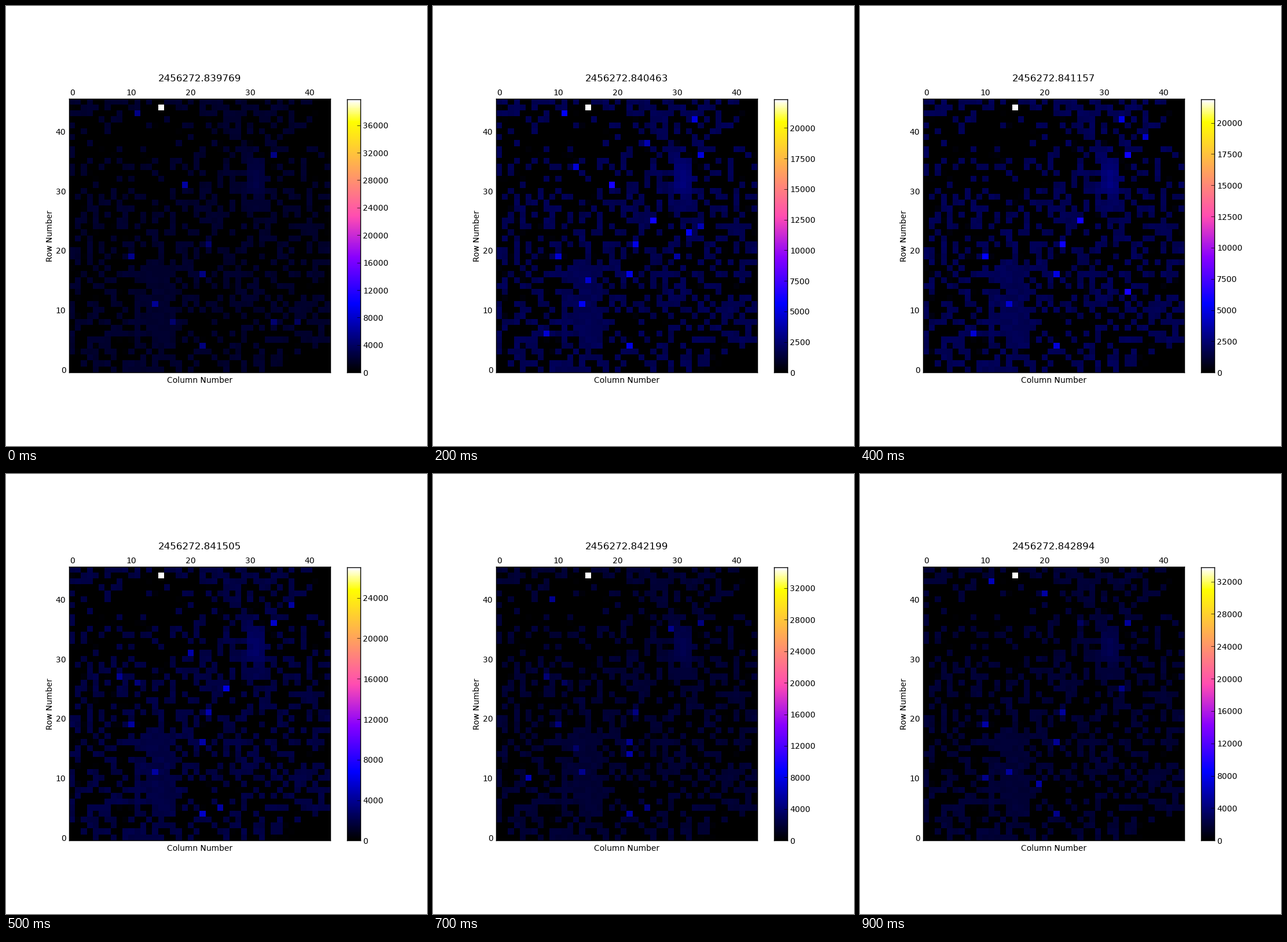
Animation, 727 px wide and 759 px high, one loop 1 s. Source, as a matplotlib script:

```python
import numpy as np
import matplotlib.pyplot as plt
from matplotlib.animation import FuncAnimation

W, H, DPI = 727, 759, 100
COLS, ROWS = 44, 46
FRAMES = 10
START_DATE = 2456272.83976855
DATE_STEP = 1 / 2880
PEAKS = [39730, 42930, 22328, 22050, 21862, 27000, 32490, 34600, 36710, 33727]
WHITE_CELL = (44, 15)
STEADY_CELLS = [(36, 34), (21, 23), (16, 22), (4, 22), (19, 10), (11, 14)]

plt.rcParams.update({"font.family": "DejaVu Sans", "font.size": 10,
                     "text.hinting": "default", "axes.linewidth": 1})

row, col = np.mgrid[:ROWS, :COLS]


def blob(c, r, width, height):
    """Soft bump with its peak of 1 at the given cell."""
    return np.exp(-((col - c) / width) ** 2 - ((row - r) / height) ** 2)


ridge = blob(31, 32, 1.8, 4)


def make_field(rng):
    """Dim cells, denser along two columns and rare in the voids."""
    share = (.42 + .8 * ridge + .8 * blob(14.5, 9, 3, 8)
             + .15 * blob(26, 40, 5, 8) - .36 * blob(14, 37, 9, 7)
             - .2 * blob(3, 32, 5, 7) - .25 * blob(38, 36, 4, 6)
             - .2 * blob(20, 5, 2, 6) - blob(42, 0, 5, 3) - blob(43, 44, 2, 4))
    lit = rng.uniform(1650, 2000, share.shape)
    faint = rng.uniform(0, 350, share.shape)
    draw = rng.random(share.shape)
    field = np.where(draw < share, lit, np.where(draw < share + .08, faint, 0))
    return field + 900 * ridge * (draw < share)


def make_flashes(rng, count=36):
    """Cells that glow for a few frames: row, column, start, end, level."""
    start = rng.integers(-2, FRAMES, count)
    return list(zip(rng.integers(1, ROWS, count), rng.integers(2, COLS, count),
                    start, start + rng.integers(1, 5, count),
                    rng.uniform(3000, 6300, count)))


seeded = np.random.default_rng(12)
FIELD = make_field(seeded)
FLASHES = make_flashes(seeded)


def levels(i):
    rng = np.random.default_rng(100 + i)
    data = FIELD * rng.normal(1, .02, FIELD.shape)
    for r, c, start, end, level in FLASHES:
        if start <= i < end:
            data[r, c] = level
    for cell in STEADY_CELLS:
        data[cell] = rng.uniform(4200, 5900)
    data[WHITE_CELL] = PEAKS[i]
    return data


def pixel_axes(x, y, w, h):
    """Axes placed in pixels from the top left corner."""
    return fig.add_axes([x / W, 1 - (y + h) / H, w / W, h / H])


fig = plt.figure(figsize=(W / DPI, H / DPI), dpi=DPI, facecolor="white")

ax = pixel_axes(109.1, 160.4, 450.8, 471.9)
image = ax.imshow(FIELD, cmap="gnuplot2", origin="lower", aspect="auto",
                  interpolation="nearest", extent=(-.5, 43.5, -.5, 45.56))
ax.set_ylim(-.5, ROWS - .5)
ax.set_xticks(range(0, COLS, 10))
ax.set_yticks(range(0, ROWS, 10))
ax.xaxis.tick_top()
ax.xaxis.set_label_position("bottom")
ax.tick_params(axis="x", length=0, pad=2.5)
ax.tick_params(axis="y", length=0, pad=4)
ax.set_xlabel("Column Number", labelpad=5)
ax.set_ylabel("Row Number", labelpad=2)
title = ax.set_title("", fontsize=12, y=1.05, pad=5)

bar = pixel_axes(589, 161.4, 22.9, 470.9)
bar.imshow(np.linspace(0, 1, 256)[:, None], cmap="gnuplot2", origin="lower",
           aspect="auto", extent=(0, 1, 0, 1))
bar.set_xticks([])
bar.yaxis.tick_right()
bar.tick_params(direction="in", length=4, width=.5, pad=3)


def update(i):
    peak = PEAKS[i]
    image.set_data(levels(i))
    image.set_clim(0, peak)
    title.set_text(f"{START_DATE + i * DATE_STEP:.6f}")
    step = next(s for s in (2000, 2500, 4000, 5000) if peak / s <= 10)
    ticks = np.arange(0, peak, step)
    bar.set_yticks(ticks / peak, [str(t) for t in ticks])
    return image, title


anim = FuncAnimation(fig, update, frames=FRAMES, interval=1000 / FRAMES,
                     repeat=True)
plt.show()
```
